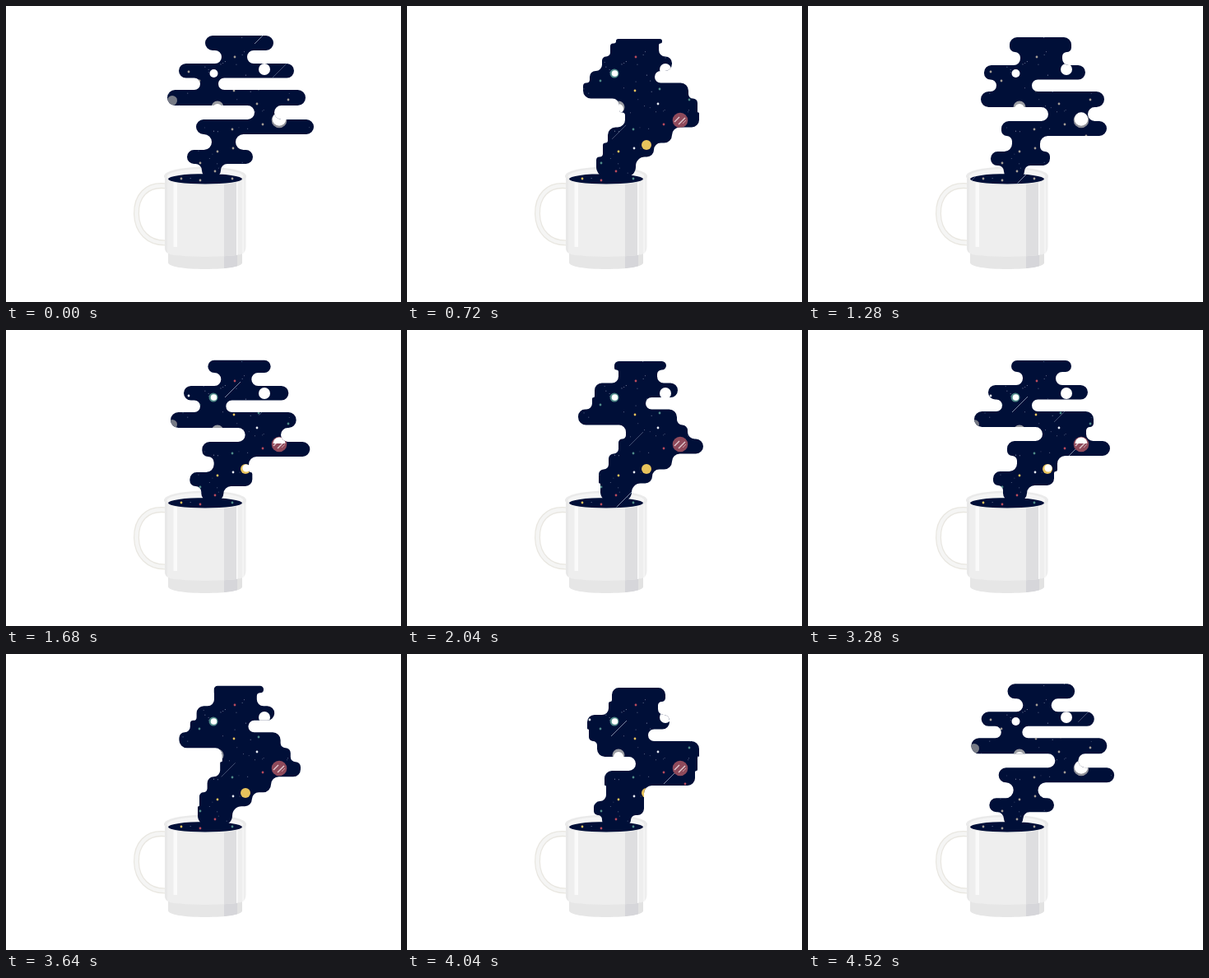
Write an HTML page with a canvas that moves like this. It is 480 px wide and 360 px high and loops after 4.56 s.

```html
<!DOCTYPE html>
<html>
<head>
<meta charset="utf-8">
<style>
html, body { margin: 0; width: 100%; height: 100%; overflow: hidden; background: #fff; }
canvas { display: block; }
</style>
</head>
<body>
<canvas id="stage" width="480" height="360"></canvas>
<script>
const c = document.getElementById('stage').getContext('2d');
const LOOP = 4560, CYCLE = 1520, NIGHT = '#000f38';

// Steam: stacked bands with rounded steps between them.
const bandY = [36, 54, 70, 87.5, 102, 121, 138, 156, 175, 192, 208];
// Each pose: time, band shift, top, ten left edges, ten right edges
const poses = [
  [0, 0, 36, 242, 262, 210, 236, 196, 302, 231, 250, 220, 238,
    325, 293, 350, 258, 364, 326, 374, 279, 300, 261],
  [240, -3, 37, 247, 261, 219, 236, 202, 285, 242, 254, 225, 237,
    320, 301, 340, 272, 347, 338, 367, 303, 299, 266],
  [520, -5.5, 38, 252, 257, 228, 225, 208, 266, 257, 245, 233, 235,
    315, 304, 329, 290, 328, 341, 360, 322, 298, 273],
  [720, -8.5, 40, 254, 247, 237, 222, 214, 258, 265, 244, 238, 230,
    310, 306, 322, 301, 342, 353, 355, 322, 300, 278],
  [1000, 4, 41, 249, 245, 219, 221, 231, 278, 240, 242, 227, 237,
    314, 305, 319, 293, 355, 353, 350, 288, 288, 272],
  [1280, 2, 38, 245, 258, 214, 229, 210, 292, 235, 248, 222, 238,
    320, 309, 337, 272, 360, 340, 363, 282, 294, 263]
];

function poseAt(p) {
  let i = poses.length - 1;
  while (poses[i][0] > p) i--;
  const a = poses[i], b = poses[(i + 1) % poses.length];
  const k = (p - a[0]) / ((b[0] || CYCLE) - a[0]);
  return a.map((v, j) => v + (b[j] - v) * k);
}

function steamPath(p) {
  const [, dy, top, ...x] = poseAt(p);
  const y = bandY.map((v, i) => i === 0 ? top : i === 10 ? v : v + dy);
  const pts = [];
  for (let i = 0; i < 10; i++) pts.push([x[10 + i], y[i]], [x[10 + i], y[i + 1]]);
  for (let i = 9; i >= 0; i--) pts.push([x[i], y[i + 1]], [x[i], y[i]]);
  const path = new Path2D(), n = pts.length;
  path.moveTo((x[0] + x[10]) / 2, top);
  pts.forEach((q, i) => {
    const a = pts[(i + n - 1) % n], b = pts[(i + 1) % n];
    const d = r => Math.abs(r[0] - q[0]) + Math.abs(r[1] - q[1]);
    path.arcTo(q[0], q[1], b[0], b[1], Math.min(d(a), d(b)) / 2);
  });
  path.closePath();
  path.ellipse(242, 210.3, 45, 6.2, 0, 0, 7);
  return path;
}

function disc(x, y, r, fill) {
  c.fillStyle = fill;
  c.beginPath();
  c.arc(x, y, r, 0, 7);
  c.fill();
}

function line(x1, y1, x2, y2, color, w) {
  c.strokeStyle = color;
  c.lineWidth = w;
  c.beginPath();
  c.moveTo(x1, y1);
  c.lineTo(x2, y2);
  c.stroke();
}

let seed = 11;
const rnd = () => (seed = seed * 16807 % 2147483647) / 2147483647;
const dust = Array.from({ length: 95 }, () => [195 + rnd() * 180, 38 + rnd() * 178, .3 + rnd() * .5]);
const RED = '#b84a5c', GOLD = '#e8c35c', TEAL = '#4f8a88', PALE = '#e8ecf4';
const stars = [
  [278, 62, RED], [277, 103, GOLD], [235, 91, TEAL], [257, 177, GOLD], [236, 191, TEAL],
  [254, 201, RED], [275, 150, TEAL], [312, 144, RED], [305, 119, PALE], [276, 173, PALE],
  [343, 114, TEAL], [338, 158, RED], [213, 210, GOLD], [236, 212, RED], [275, 210, TEAL],
  [222, 80, PALE], [307, 101, TEAL], [206, 113, RED]
];

function streak(x, sum, len, alpha) {
  line(x, sum - x, x + len, sum - x - len, `rgba(205,220,235,${alpha})`, .8);
}

function drawSky(p) {
  const muted = p < 120 || p >= 1140;
  for (const [x, y, a] of dust) {
    c.fillStyle = `rgba(200,210,230,${a})`;
    c.fillRect(x, y, .9, .9);
  }
  for (const [x, y, col] of stars) disc(x, y, 1.4, muted ? '#a39c94' : col);

  const h = p % 760, lead = h > 680 ? h - 760 : h;
  if (lead < 430) streak(302 - .225 * lead, 348, 19, .75);
  streak(324 - .104 * (p > 1400 ? p - CYCLE : p), 411, 17, .4);
  if (h > 60 && h < 600) streak(312 - .205 * (h - 240), 470, 19, .75);

  disc(202, 115, 6, '#777b86');
  disc(257, 123, 7.5, '#9a9ca2');
  disc(257, 125, 6, '#fff');

  if (!muted) disc(252, 82, 5.5, TEAL);
  disc(252.5, 82, muted ? 5 : 3.8, '#fff');
  disc(314, 77, 7, '#fff');

  disc(291, 169, 6, muted ? '#b6b2a8' : GOLD);
  if (p > 120 && p < 380) disc(292, 168, 4.6, '#fff');

  disc(332, 139, 9.3, muted ? '#8f9098' : '#8f4a5b');
  if (muted) disc(332, 137.5, 8.2, '#fff');
  else {
    line(325, 141, 331, 135, '#e2ccd2', 1.2);
    line(330, 144, 338, 136, '#e2ccd2', 1.2);
    line(335, 143, 339, 139, '#c99ea9', 1);
    if (p < 380) {
      c.fillStyle = '#fff';
      c.beginPath();
      c.arc(332, 138, 7.5, Math.PI, 0);
      c.fill();
    }
  }
}

function rect(x, y, w, h, fill) {
  c.fillStyle = fill;
  c.fillRect(x, y, w, h);
}

function drawMug() {
  c.lineCap = 'butt';
  const handle = new Path2D('M195 219C170 216 158 232 158.5 253C159 274 173 289 195 288');
  c.strokeStyle = '#e9e7e1';
  c.lineWidth = 7;
  c.stroke(handle);
  c.strokeStyle = '#f5f5f4';
  c.lineWidth = 4.5;
  c.stroke(handle);

  // Foot
  const foot = new Path2D('M197 298H287V312C287 317 268 320 242 320S197 317 197 312Z');
  c.save();
  c.clip(foot);
  rect(190, 290, 110, 40, '#e6e6e6');
  rect(265, 290, 16, 40, '#d6d6da');
  rect(281, 290, 10, 40, '#e2e2e2');
  c.restore();

  // Body
  const body = new Path2D('M193 206H291.5V293C291 301 287 302 280 303Q242 307 204 303C197 302 193 300 193 293Z');
  c.save();
  c.clip(body);
  rect(190, 200, 105, 110, '#eeeeee');
  rect(190, 200, 6, 110, '#e8e8e8');
  rect(203.5, 200, 4.5, 93, '#fafafa');
  rect(265, 200, 15, 110, '#dedee0');
  rect(280, 200, 1.5, 110, '#fafafa');
  rect(287.5, 200, 1.2, 110, '#f8f8f8');
  c.restore();

  // Rim
  c.fillStyle = '#eaeaea';
  c.beginPath();
  c.ellipse(242, 207, 50, 11.5, 0, 0, 7);
  c.fill();
  c.fillStyle = '#f5f5f5';
  c.beginPath();
  c.ellipse(242, 207.3, 46.5, 9.2, 0, 0, 7);
  c.fill();
}

function draw(t) {
  const p = t % CYCLE;
  c.fillStyle = '#fff';
  c.fillRect(0, 0, 480, 360);
  drawMug();
  const steam = steamPath(p);
  c.fillStyle = NIGHT;
  c.fill(steam);
  c.save();
  c.clip(steam);
  drawSky(p);
  c.restore();
}

const start = performance.now();
function tick(now) {
  const t = Math.max(0, now - start) % LOOP;
  draw(Math.floor(t / 40) * 40);
  requestAnimationFrame(tick);
}
draw(0);
requestAnimationFrame(tick);
</script>
</body>
</html>
```
